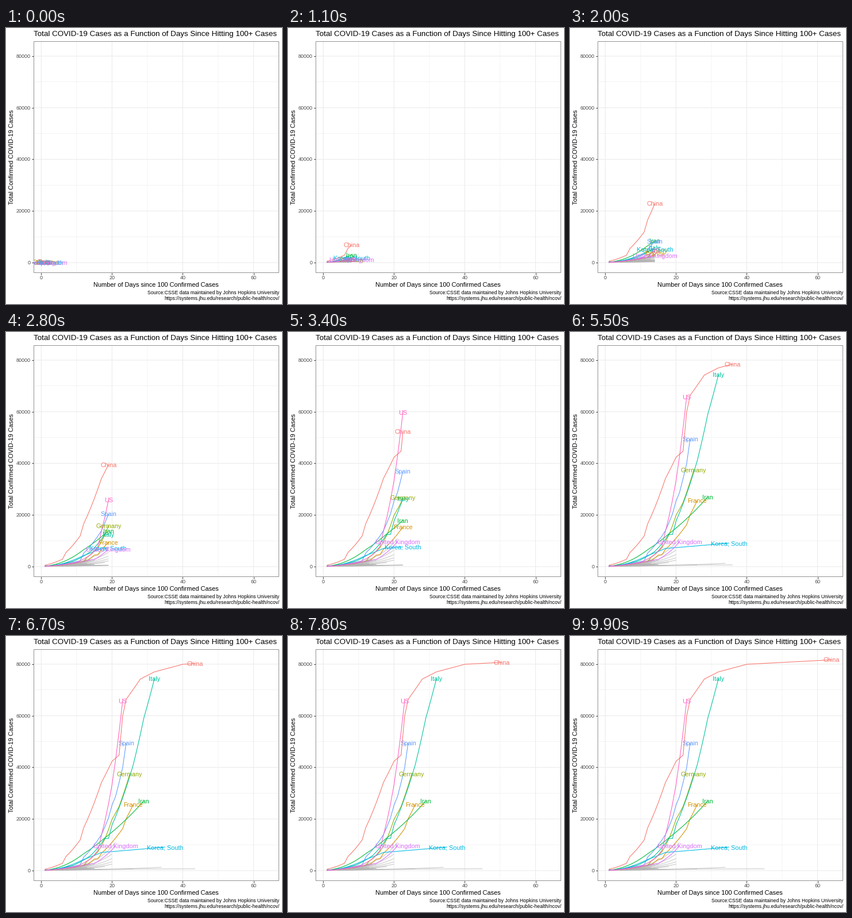
These frames come from a looping animation (480x480 px, 10 s). A matplotlib script:

```python
import matplotlib.pyplot as plt
import numpy as np
from matplotlib.animation import FuncAnimation

SIZE, FRAMES, LAST_DAY = 480, 100, 64
PT = 0.75  # points per pixel at 96 dpi
LEFT, RIGHT, TOP, BOTTOM = 48.1, 474.5, 23.1, 425.9
INK, TICK_INK, GRID, BORDER = "#333333", "#4D4D4D", "#EBEBEB", "#939393"

plt.rcParams.update({
    "font.family": "Liberation Sans",
    "text.hinting": "force_autohint",
    "text.hinting_factor": 8,
})


def curve(*keys):
    """Daily counts through (day, count) keys, linear in the square root."""
    days, counts = zip(*keys)
    daily = np.arange(1, days[-1] + 1)
    return np.interp(daily, days, np.sqrt(counts)) ** 2


def trend(days, first, last, bend=0.7):
    """Growth that slows down on a log scale."""
    u = np.linspace(0, 1, days)
    return first * (last / first) ** (u ** bend)


def other_trends():
    """Unlabelled countries: a few long flat ones, a fan and a seeded crowd."""
    rng = np.random.default_rng(19)
    yield trend(45, 135, 712, 0.15)
    yield trend(34, 105, 1307)
    yield trend(26, 102, 631)
    yield trend(21, 114, 10897)
    for last in np.geomspace(6400, 2500, 4):
        yield trend(20, 110, last)
    for _ in range(26):
        yield trend(rng.integers(8, 19), rng.uniform(100, 150),
                    np.exp(rng.uniform(np.log(350), np.log(2900))))


NAMED = [
    ("China", "#F8766D", curve(
        (1, 548), (6, 2877), (7, 5509), (11, 11891), (12, 16630),
        (17, 34110), (20, 42354), (22, 44759), (23, 59895), (24, 66358),
        (28, 74211), (32, 77001), (40, 79932), (64, 81661))),
    ("France", "#D39200", curve(
        (1, 100), (13, 2293), (15, 4496), (16, 4532), (17, 6683),
        (20, 10970), (23, 16243), (24, 20123), (26, 25600))),
    ("Germany", "#93AA00", curve(
        (1, 130), (12, 2078), (13, 3675), (16, 7272), (18, 12327),
        (20, 19848), (22, 24873), (25, 37323))),
    ("Iran", "#00BA38", curve(
        (1, 139), (7, 2336), (12, 6566), (18, 12729), (29, 27017))),
    ("Italy", "#00C19F", curve(
        (1, 155), (9, 2036), (14, 5883), (18, 12462), (19, 12462),
        (20, 17660), (26, 41035), (29, 59138), (32, 74386))),
    ("Korea, South", "#00B9E3", curve(
        (1, 104), (5, 833), (12, 4335), (17, 7041), (35, 9137))),
    ("Spain", "#619CFF", curve(
        (1, 120), (11, 2277), (12, 5232), (17, 13910), (19, 20410),
        (20, 25374), (21, 28768), (23, 39885), (24, 49515))),
    ("United Kingdom", "#DB72FB", curve(
        (1, 116), (14, 2642), (15, 2716), (19, 6726), (21, 9640))),
    ("US", "#FF61C3", curve(
        (1, 118), (10, 1663), (14, 4632), (16, 7783), (17, 13677),
        (20, 33276), (23, 65778))),
]
PEAK = NAMED[0][2][-1]

fig = plt.figure(figsize=(5, 5), dpi=96, facecolor="white")
ax = fig.add_axes([LEFT / SIZE, 1 - BOTTOM / SIZE,
                   (RIGHT - LEFT) / SIZE, (BOTTOM - TOP) / SIZE])


def write(x, y, text, px, color="black", **kw):
    """Text with its baseline at pixel (x, y), counted from the top left."""
    fig.text(x / SIZE, 1 - y / SIZE, text, fontsize=px * PT, color=color,
             va="baseline", **kw)


def setup_axes():
    pad_x = 0.05 * (LAST_DAY - 1)
    pad_y = 0.05 * (PEAK - 100)
    ax.set_xlim(1 - pad_x, LAST_DAY + pad_x)
    ax.set_ylim(100 - pad_y, PEAK + pad_y)
    ax.set_xticks(range(0, 61, 20), labels=[])
    ax.set_yticks(range(0, 80001, 20000), labels=[])
    ax.tick_params(length=2.75 * PT, width=1.07 * PT, color=INK)

    for width, start in ((0.53, 0.5), (1.07, 0)):
        style = dict(color=GRID, lw=width * PT, zorder=0, snap=False)
        for k in np.arange(start, 4):
            ax.axvline(20 * k, **style)
        for k in np.arange(start, 4.1):
            ax.axhline(20000 * k, **style)

    ax.spines[:].set_visible(False)
    fig.add_artist(plt.Rectangle(
        (48.5 / SIZE, 1 - 425.5 / SIZE), 426 / SIZE, 402 / SIZE, fill=False,
        ec=BORDER, lw=PT, snap=False, transform=fig.transFigure))

    x0, x1 = ax.get_xlim()
    y0, y1 = ax.get_ylim()
    for day in range(0, 61, 20):
        x = LEFT + (day - x0) / (x1 - x0) * (RIGHT - LEFT)
        write(x, 437, str(day), 9, TICK_INK, ha="center")
    for count in range(0, 80001, 20000):
        y = BOTTOM - (count - y0) / (y1 - y0) * (BOTTOM - TOP)
        write(43, y + 3, str(count), 9, TICK_INK, ha="right")


def setup_titles():
    write(48, 14, "Total COVID-19 Cases as a Function of Days "
          "Since Hitting 100+ Cases", 13.35)
    write((LEFT + RIGHT) / 2, 450, "Number of Days since 100 Confirmed Cases",
          11, ha="center")
    write(13, (TOP + BOTTOM) / 2, "Total Confirmed COVID-19 Cases", 11,
          ha="center", rotation=90, rotation_mode="anchor")
    write(475.5, 463,
          "Source:CSSE data maintained by Johns Hopkins University",
          8.62, ha="right")
    write(475.5, 473, "https://systems.jhu.edu/research/public-health/ncov/",
          8.62, ha="right")


def add_line(color, **kw):
    return ax.plot([], [], color=color, lw=1.07 * PT, solid_capstyle="butt",
                   solid_joinstyle="round", **kw)[0]


def add_label(name, color):
    return ax.annotate(name, (1, 100), xytext=(0, -4 * PT),
                       textcoords="offset points", ha="center", va="baseline",
                       color=color, fontsize=10.75 * PT, zorder=5,
                       clip_on=True)


setup_axes()
setup_titles()

tracks = [(counts, add_line("#B3B3B3", alpha=0.7, zorder=2), None)
          for counts in other_trends()]
tracks += [(counts, add_line(color, zorder=3), add_label(name, color))
           for name, color, counts in NAMED]

# Each day is reached on a whole frame; positions in between are linear.
DAYS = np.arange(1, LAST_DAY + 1)
REACHED = np.round((DAYS - 1) * (FRAMES - 1) / (LAST_DAY - 1))


def draw(i):
    today = np.interp(i, REACHED, DAYS)
    for counts, line, label in tracks:
        days = DAYS[:len(counts)]
        now = min(today, days[-1])
        value = np.interp(now, days, counts)
        past = days < now
        line.set_data(np.append(days[past], now),
                      np.append(counts[past], value))
        if label:
            label.xy = (now, value)
    return []


anim = FuncAnimation(fig, draw, frames=FRAMES, interval=100, repeat=True,
                     repeat_delay=0, init_func=lambda: draw(0))
plt.show()
```
